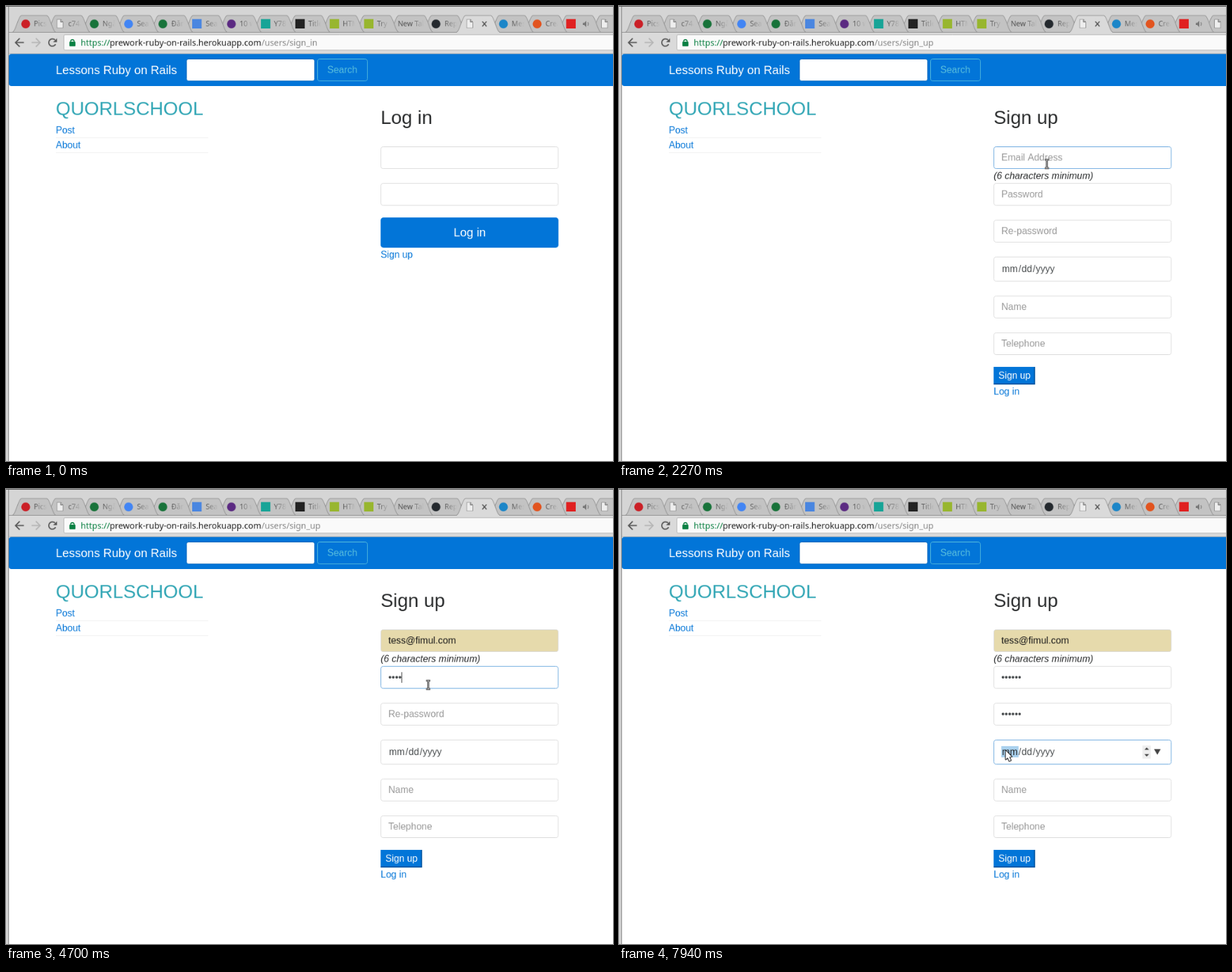
An HTML page with a canvas for the animation above (7990 ms loop, 864 by 648 pixels).

```html
<!DOCTYPE html>
<html lang="en">
<head>
<meta charset="utf-8">
<title>Sign up form</title>
<style>
html, body { margin: 0; width: 100%; height: 100%; overflow: hidden; background: #fff; }
canvas { display: block; width: 864px; height: 648px; }
</style>
</head>
<body>
<canvas id="stage" width="1024" height="768"></canvas>
<script>
const ctx = document.getElementById('stage').getContext('2d');
const LOOP = 7990;
// The screen is 1024 wide, shown at 864; boxes and text snap to screen pixels
const K = 1024 / 864;
const SANS = '"Liberation Sans", Arial, sans-serif';
const UI = '"Noto Sans", "Open Sans", sans-serif';
const BLUE = '#0275d8', DARK = '#292b2c', GREY = '#464a4c';
const EMAIL = 'tess@fimul.com';

// Moments of the story, in ms
const ENTER = 60, NEW_URL = 1050, NEW_PAGE = 1320;
const MENU_OPEN = 2320, MENU_HOVER = 2560, FILLED = 3020;
const FOCUS = { email: NEW_PAGE, pass: 3600, again: 5450, date: 7740 };
const ORDER = ['email', 'pass', 'again', 'date'];
const PASS_KEYS = [4070, 4200, 4330, 4650, 4820, 4980];
const AGAIN_KEYS = [5750, 5900, 6030, 6330, 6500, 6700];

// Pointer path: time, x, y
const PATH = [
  [60, 592, 322], [280, 578, 334], [590, 555, 358],
  [1540, 555, 358], [1950, 609, 216],
  [2220, 609, 216], [2270, 609, 225], [2340, 609, 225], [2690, 591, 262],
  [3020, 591, 262], [3080, 591, 268], [3200, 591, 268], [3480, 601, 278],
  [4070, 601, 278], [4330, 601, 279], [5040, 601, 279], [5300, 615, 306],
  [5410, 615, 306], [5540, 606, 321], [6070, 605, 323],
  [6680, 605, 323], [6930, 618, 334],
  [7200, 618, 334], [7440, 584, 419], [7700, 550, 372]
];

// Form fields: top, height, placeholder
const FIELDS = {
  email: [200, 32.1, 'Email Address'],
  pass: [252.3, 32.1, 'Password'],
  again: [304.6, 32.1, 'Re-password'],
  date: [357, 35.4, ''],
  name: [412.7, 32.1, 'Name'],
  phone: [465, 32.1, 'Telephone']
};
const baseline = name => FIELDS[name][0] + (name === 'date' ? 22 : 20.3);

// Tabs: mark shape, colour, title
const TABS = [
  ['dot', '#cb2027', 'Pics'], ['doc', '', 'c74a'], ['dot', '#18733a', 'Ngân'],
  ['dot', '#4285f4', 'Sear'], ['dot', '#18733a', 'Đăng'], ['box', '#4a86e0', 'Sear'],
  ['dot', '#5b2a82', '10 w'], ['box', '#18a497', 'Y78a'], ['box', '#222222', 'Title'],
  ['box', '#98b62f', 'HTM'], ['box', '#98b62f', 'Try i'], ['', '', 'New Tab'],
  ['dot', '#24292e', 'Rep'], ['doc', '', ''], ['dot', '#1c86c8', 'Mes'],
  ['dot', '#e2541f', 'Crea'], ['box', '#e02020', ''], ['doc', '', '']
];
const ACTIVE = 13;

const clamp = v => Math.max(0, Math.min(1, v));
const ease = v => v * v * (3 - 2 * v);
const snap = v => Math.round(v * K);
const tabX = i => i < 12 ? 28 + 48.8 * i : 612 + 48 * (i - 12);

// Runs a drawing step in screen pixels
function onScreen(step) {
  ctx.save();
  ctx.resetTransform();
  step();
  ctx.restore();
}

function rect(x, y, w, h, color) {
  onScreen(() => {
    const left = snap(x), top = snap(y);
    ctx.fillStyle = color;
    ctx.fillRect(left, top, Math.max(1, snap(x + w) - left), Math.max(1, snap(y + h) - top));
  });
}

function round(x, y, w, h, r, fill, stroke) {
  onScreen(() => {
    const left = snap(x), top = snap(y), inset = stroke ? 0.5 : 0;
    ctx.beginPath();
    ctx.roundRect(left + inset, top + inset,
      snap(x + w) - left - 2 * inset, snap(y + h) - top - 2 * inset, r * K);
    if (fill) { ctx.fillStyle = fill; ctx.fill(); }
    if (stroke) { ctx.strokeStyle = stroke; ctx.lineWidth = 1; ctx.stroke(); }
  });
}

function text(s, x, y, color, size = 13.5, family = SANS, style = '') {
  let width;
  onScreen(() => {
    ctx.font = `${style} ${size * K}px ${family}`;
    ctx.fillStyle = color;
    ctx.fillText(s, snap(x), snap(y));
    width = ctx.measureText(s).width / K;
  });
  return width;
}

function poly(points, fill, stroke, width = 1, close = true) {
  ctx.beginPath();
  points.forEach(([x, y]) => ctx.lineTo(x, y));
  if (close) ctx.closePath();
  if (stroke) { ctx.strokeStyle = stroke; ctx.lineWidth = width; ctx.stroke(); }
  if (fill) { ctx.fillStyle = fill; ctx.fill(); }
}

function disc(x, y, r, color) {
  ctx.beginPath();
  ctx.arc(x, y, r, 0, 7);
  ctx.fillStyle = color;
  ctx.fill();
}

function tab(i) {
  const c = tabX(i), on = i === ACTIVE, [mark, color, title] = TABS[i];
  ctx.beginPath();
  ctx.moveTo(c - 19, 37.5);
  ctx.bezierCurveTo(c - 14, 37, c - 11, 14, c - 6, 13.5);
  ctx.lineTo(c + 30, 13.5);
  ctx.bezierCurveTo(c + 35, 14, c + 38, 37, c + 43, 37.5);
  ctx.fillStyle = on ? '#dadada' : '#c3c3c3';
  ctx.fill();
  ctx.strokeStyle = '#949494';
  ctx.lineWidth = 0.85;
  ctx.stroke();

  if (mark === 'dot') disc(c, 25.5, 6.3, color);
  if (mark === 'box') rect(c - 6.7, 18.6, 13.5, 13.5, color);
  if (mark === 'doc') {
    poly([[c - 4, 19.5], [c + 1, 19.5], [c + 4, 22.5], [c + 4, 31], [c - 4, 31]], '#eee', '#666');
    poly([[c + 1, 19.5], [c + 1, 22.5], [c + 4, 22.5]], '', '#666', 1, false);
  }
  if (title) {
    const x = mark ? c + 12 : c - 7.5, end = c + 30;
    const fade = ctx.createLinearGradient((end - 18) * K, 0, end * K, 0);
    fade.addColorStop(0, '#505050');
    fade.addColorStop(1, 'rgba(80,80,80,0)');
    ctx.save();
    ctx.beginPath();
    ctx.rect(x, 14, end - x, 22);
    ctx.clip();
    text(title, x, 28.7, fade, 10.125, UI);
    ctx.restore();
  }
}

function browser(t) {
  rect(0, 0, 864, 68, '#d5d5d5');
  for (let i = TABS.length - 1; i >= 0; i--) if (i !== ACTIVE) tab(i);
  rect(4, 37, 860, 0.8, '#949494');
  rect(4, 37.9, 860, 30, '#dadada');
  tab(ACTIVE);
  rect(642, 37, 60, 2, '#dadada');
  poly([[678, 22], [684, 29]], '', '#555', 1.4, false);
  poly([[684, 22], [678, 29]], '', '#555', 1.4, false);
  poly([[821, 24], [823, 24], [826, 21], [826, 30], [823, 27], [821, 27]], '#777');
  poly([[828, 23], [829, 25.5], [828, 28]], '', '#777', 1, false);

  for (const [x, d, color] of [[13.5, 1, '#555'], [48.5, -1, '#b5b5b5']]) {
    poly([[x, 52], [x + 12 * d, 52]], '', color, 1.7, false);
    poly([[x + 6 * d, 46], [x, 52], [x + 6 * d, 58]], '', color, 1.7, false);
  }
  ctx.beginPath();
  ctx.arc(66, 52, 5.2, 0.5, 5.5);
  ctx.strokeStyle = '#555';
  ctx.lineWidth = 1.7;
  ctx.stroke();
  poly([[72.5, 46], [72.5, 51.5], [67, 51.5]], '#555');

  round(82, 40.5, 800, 23, 2, '#fafafa', '#b0b0b0');
  round(90.5, 51, 8, 6.5, 1, '#0b8043');
  ctx.beginPath();
  ctx.arc(94.5, 50.5, 2.5, Math.PI, 0);
  ctx.strokeStyle = '#0b8043';
  ctx.lineWidth = 1.4;
  ctx.stroke();
  text('https://', 106.3, 56.5, '#0b8043', 12.1, UI);
  text('prework-ruby-on-rails.herokuapp.com', 147.8, 56.5, '#222', 12.1, UI);
  text('/users/' + (t < NEW_URL ? 'sign_in' : 'sign_up'), 363.8, 56.5, '#858585', 12.1, UI);

  rect(0, 67.5, 864, 0.8, '#b0b0b0');
  rect(0, 0, 864, 0.8, '#555');
  rect(0, 0.8, 3.4, 648, '#d5d5d5');
  rect(3.4, 0.8, 0.8, 648, '#707070');
}

function site() {
  round(4.2, 68.4, 870, 45.5, 3.4, BLUE);
  text('Lessons Ruby on Rails', 71, 97, '#fff', 16.875);
  round(256.5, 75.1, 183, 32.1, 3.4, '#fff', '#0263b8');
  round(443, 75.1, 71.7, 32.1, 3.4, '', '#5bc0de');
  text('Search', 457.4, 95.3, '#5bc0de');
  text('QUORLSCHOOL', 71, 155.2, '#31a6b5', 27);
  text('Post', 71, 181.5, BLUE);
  text('About', 71, 202.6, BLUE);
  rect(71, 187.3, 217, 0.8, '#eee');
  rect(71, 208.4, 217, 0.8, '#eee');
}

function field(name, glow, fill = '#fff') {
  const [y, h] = FIELDS[name];
  const mix = [[217, 92], [217, 160], [217, 220]].map(([a, b]) => Math.round(a + (b - a) * glow));
  round(533.3, y, 253.1, h, 3.4, fill, `rgb(${mix})`);
}

function loginPage(t, p) {
  text('Log in', 533.3, 168, DARK, 27);
  field('email', t > 890 ? 0.5 * clamp((NEW_URL - t) / 160) : 0);
  field('pass', 0);
  const onButton = p && p.y < 344, onLink = p && p.y >= 346;
  round(533.3, 301.2, 253.1, 43, 4, onButton ? '#025aa5' : BLUE);
  text('Log in', 636.7, 328.5, '#fff', 16.875);
  const color = onLink ? '#014c8c' : BLUE;
  const w = text('Sign up', 533.3, 358.6, color);
  if (onLink) rect(533.3, 360.3, w, 0.8, color);
}

function glow(name, t) {
  const i = ORDER.indexOf(name);
  if (i < 0) return 0;
  const next = FOCUS[ORDER[i + 1]] || Infinity;
  const rise = i ? clamp((t - FOCUS[name]) / 150) : 1;
  return rise * (1 - clamp((t - next) / 150));
}

function caret(name, t, x, keys) {
  const current = ORDER.filter(n => FOCUS[n] <= t).pop();
  if (current !== name) return;
  const last = Math.max(FOCUS[name], ...keys.filter(k => k <= t));
  if (Math.floor((t - last) / 500) % 2 === 0) rect(x, FIELDS[name][0] + 8.4, 0.8, 15.2, '#222');
}

function secret(name, t, keys) {
  const n = keys.filter(k => k <= t).length, y = baseline(name);
  const w = n ? text('•'.repeat(n), 544.2, y, GREY) : 0;
  if (!n) text(FIELDS[name][2], 544.2, y, '#999');
  caret(name, t, 544.2 + w, keys);
}

function dateField(t, p) {
  const picked = t >= FOCUS.date;
  if (picked) rect(544.5, 366, 24, 16, '#a9d1ee');
  const parts = [['mm', 545], ['/', 568.3], ['dd', 572.7], ['/', 588.8], ['yyyy', 593.3]];
  for (const [s, x] of parts) text(s, x, baseline('date'), picked && s === 'mm' ? '#222' : GREY);
  const hover = p.y > 357 && p.y < 392 && t > 1540;
  if (!picked && !hover) return;
  rect(745, 365, 12, 19, '#eee');
  poly([[748, 371.5], [751, 368], [754.5, 371.5]], '#444');
  poly([[748, 377.5], [751, 381], [754.5, 377.5]], '#444');
  poly([[761.5, 370.5], [771, 370.5], [766.3, 378.5]], '#444');
}

function menu(t) {
  round(533.3, 232.1, 253.1, 102.5, 0, '#fff', '#b5b5b5');
  const rows = ['nelo@fimul.com', EMAIL, 'test1@fimul.com', 'test2@fimul.com'];
  rows.forEach((s, i) => {
    const y = 233 + i * 25.3;
    if (i === 1 && t >= MENU_HOVER) rect(534.2, y, 251.4, 25.3, '#e4e4e4');
    text(s, 544.2, y + 17, '#222');
  });
}

function signupPage(t, p) {
  text('Sign up', 533.3, 168, DARK, 27);
  const full = t >= MENU_HOVER;
  for (const name in FIELDS) {
    field(name, glow(name, t), name === 'email' && full ? '#e6daac' : '#fff');
  }
  const w = text(full ? EMAIL : FIELDS.email[2], 544.2, baseline('email'), full ? '#1a1a1a' : '#999');
  if (!full || t >= FILLED) caret('email', t, 544.2 + (full ? w : 0), [FILLED]);
  text('(6 characters minimum)', 533.3, 246.4, DARK, 13.5, SANS, 'italic');
  secret('pass', t, PASS_KEYS);
  secret('again', t, AGAIN_KEYS);
  dateField(t, p);
  for (const name of ['name', 'phone']) text(FIELDS[name][2], 544.2, baseline(name), '#999');
  rect(533.3, 513.9, 59, 25.3, BLUE);
  rect(533.3, 537.5, 59, 1.7, '#0154a0');
  rect(590.6, 513.9, 1.7, 25.3, '#0154a0');
  text('Sign up', 540, 531, '#fff');
  text('Log in', 533.3, 553.5, BLUE);
  if (t >= MENU_OPEN && t < FILLED) menu(t);
}

function pointer(t) {
  if (t < ENTER) return null;
  const i = PATH.findIndex(k => k[0] > t);
  if (i < 0) return { x: 550, y: 372 };
  const a = PATH[i - 1], b = PATH[i], k = ease((t - a[0]) / (b[0] - a[0]));
  return { x: a[1] + (b[1] - a[1]) * k, y: a[2] + (b[2] - a[2]) * k };
}

function cursorKind(t, p) {
  if (t < 1540) return 'hand';
  if (t >= MENU_OPEN && t < FILLED && p.y > 232) return 'arrow';
  for (const name in FIELDS) {
    const [y, h] = FIELDS[name];
    if (name !== 'date' && p.y >= y && p.y <= y + h) return 'beam';
  }
  return 'arrow';
}

function drawCursor(kind, p) {
  ctx.save();
  ctx.translate(Math.round(p.x), Math.round(p.y));
  ctx.lineJoin = 'round';
  if (kind === 'beam') {
    for (const [color, w] of [['#1a1a1a', 2.6], ['#f4f4f4', 0.85]]) {
      ctx.beginPath();
      for (const y of [-6, 6]) { ctx.moveTo(-3, y); ctx.lineTo(3, y); }
      ctx.moveTo(0, -6);
      ctx.lineTo(0, 6);
      ctx.strokeStyle = color;
      ctx.lineWidth = w;
      ctx.stroke();
    }
  } else if (kind === 'hand') {
    poly([[-1.5, 0], [0.5, 0], [1.2, 4], [7, 5], [8, 7], [6.5, 12.5], [-1, 12.5],
      [-4, 8], [-3.5, 6.5], [-1.5, 7.5]], '#fff', '#1a1a1a', 2);
    for (const x of [3, 5]) poly([[x, 5], [x, 7]], '', '#1a1a1a', 0.8, false);
  } else {
    poly([[0.5, 0.5], [0.5, 13], [3.3, 10.5], [5.5, 15.5], [7.7, 14.5], [5.5, 9.6], [9, 9.3]],
      '#fff', '#1a1a1a', 2);
  }
  ctx.restore();
}

function draw(t) {
  const p = pointer(t);
  ctx.setTransform(K, 0, 0, K, 0, 0);
  rect(0, 0, 864, 648, '#fff');
  browser(t);
  site();
  if (t < NEW_PAGE) loginPage(t, p);
  else signupPage(t, p);
  if (p) drawCursor(cursorKind(t, p), p);
}

const start = performance.now();
function tick() {
  draw((performance.now() - start) % LOOP);
  requestAnimationFrame(tick);
}
tick();
</script>
</body>
</html>
```
